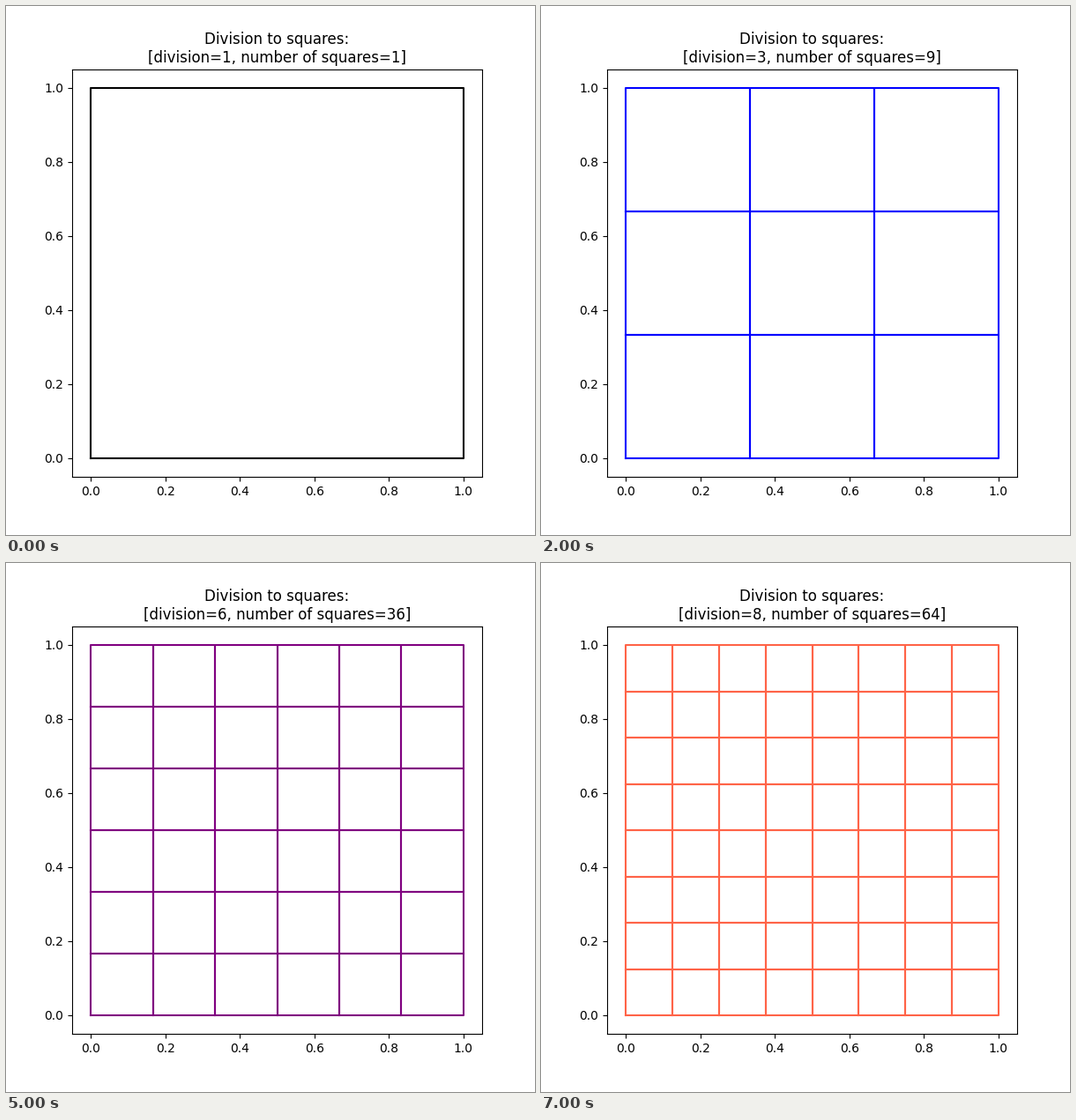
A matplotlib script for the animation above (8 s loop, 600x600 px).

```python
import matplotlib.pyplot as plt
from matplotlib.animation import FuncAnimation

COLORS = ["black", "red", "blue", "green", "gold", "purple", "lime", "tomato"]

fig, ax = plt.subplots(figsize=(6, 6), dpi=100)


def draw_square(x, y, side, color):
    xs = [x, x + side, x + side, x, x]
    ys = [y, y, y + side, y + side, y]
    ax.plot(xs, ys, color=color, linewidth=1.5)


def update(frame):
    n = frame + 1
    ax.clear()
    for row in range(n):
        for col in range(n):
            draw_square(col / n, row / n, 1 / n, COLORS[frame])
    ax.set_xlim(-0.05, 1.05)
    ax.set_ylim(-0.05, 1.05)
    ax.set_title(f"Division to squares:\n[division={n}, number of squares={n * n}]")
    return ax.lines


anim = FuncAnimation(fig, update, frames=len(COLORS), interval=1000,
                     init_func=lambda: [], repeat=True)
plt.show()
```
